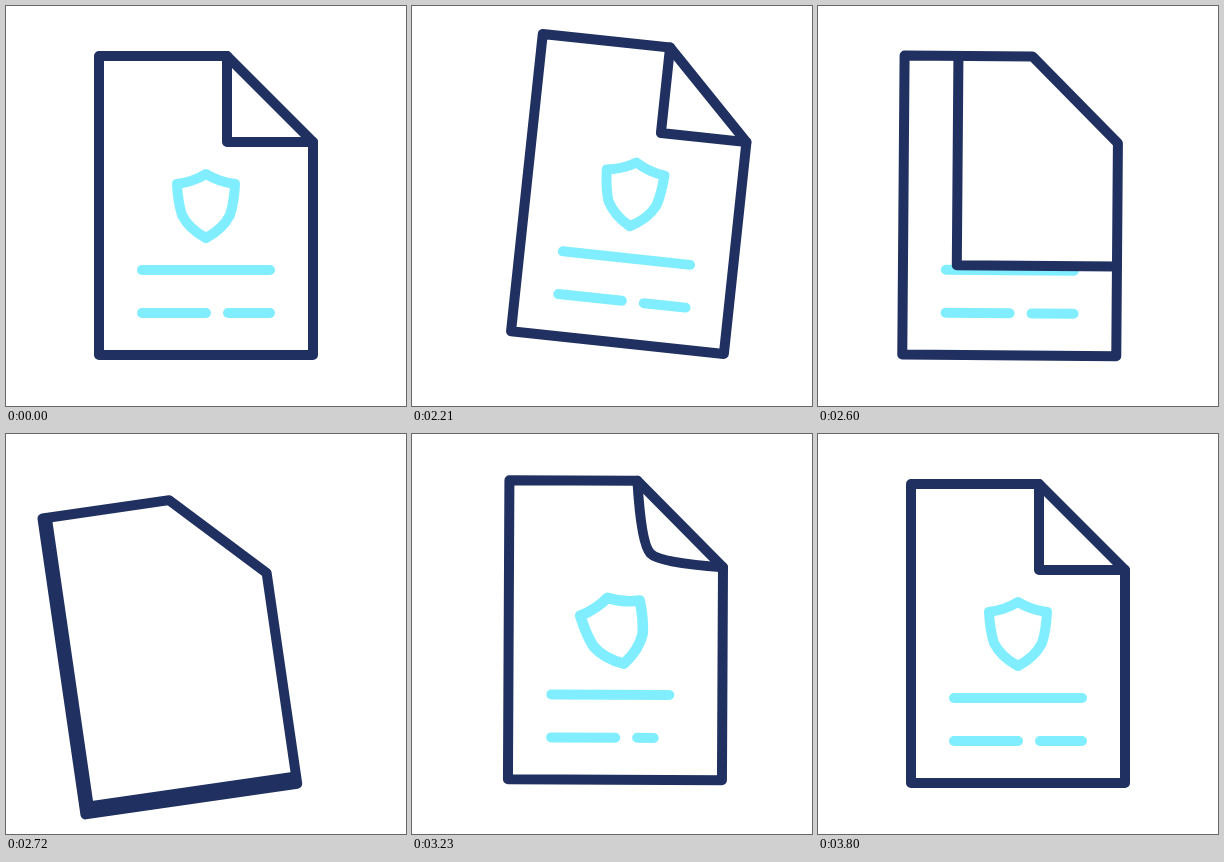
An HTML page with a canvas that plays this animation: 400 by 400 pixels, repeating every 3.86 s.

```html
<!DOCTYPE html>
<html lang="en">
<head>
<meta charset="utf-8">
<title>Document page turn</title>
<style>
  html, body { margin: 0; width: 100%; height: 100%; overflow: hidden; background: #fff; }
  canvas { display: block; width: 100vw; height: 100vh; }
</style>
</head>
<body>
<canvas id="stage" width="400" height="400"></canvas>
<script>
const ctx = document.getElementById('stage').getContext('2d');
const NAVY = '#203061', CYAN = '#80eeff';
const LOOP = 3860, START = 2030, STEP = 30, LAST = 3800;
const CX = 200, CY = 199.5;
const TURNED = 2760;

// Page geometry
const L = 93, T = 50, R = 307, B = 349, FX = 221, FY = 136;

const clamp = u => Math.min(1, Math.max(0, u));
const span = (t, a, b) => clamp((t - a) / (b - a));
const smooth = u => u * u * (3 - 2 * u);
const easeOut = u => 1 - (1 - u) * (1 - u);
const lerp = (a, b, u) => a + (b - a) * u;

// Keys are [time, value] pairs, eased in and out between neighbours
function track(t, keys) {
  let v = keys[0][1];
  for (let i = 1; i < keys.length; i++) {
    v = lerp(v, keys[i][1], smooth(span(t, keys[i - 1][0], keys[i][0])));
  }
  return v;
}

const ANGLE = [[1985, 0], [2405, 11], [2801, -10.6], [2897, -10.6], [3408, 4.5], [3790, 0]];
const MOVE_X = [[1985, 0], [2405, 38.5], [2746, -37.4], [2895, -37.4], [3380, 15.8], [3785, 0]];
const MOVE_Y = [[1985, 0], [2405, -20.9], [2798, 22], [2895, 22], [3351, -8.6], [3785, 0]];
const SHIELD_SIZE = [[TURNED, 0], [2985, 1], [3220, 1.06], [3500, 1]];
const SHIELD_TILT = [[2930, 0], [3220, -14.5], [3600, 0]];

function path(points) {
  ctx.beginPath();
  points.forEach(([x, y]) => ctx.lineTo(x, y));
}

function stroke(color) {
  ctx.strokeStyle = color;
  ctx.lineWidth = 10;
  ctx.stroke();
}

function bar(x1, x2, y, end) {
  if (end <= x1) return;
  path([[x1, y], [Math.min(x2, end), y]]);
  stroke(CYAN);
}

function shield(size, tilt) {
  if (size <= 0) return;
  ctx.save();
  ctx.translate(200, 200);
  ctx.rotate(tilt * Math.PI / 180);
  ctx.scale(size, size);
  ctx.beginPath();
  ctx.moveTo(0, -32);
  ctx.quadraticCurveTo(13, -24, 29, -22);
  ctx.quadraticCurveTo(28, -3, 24, 9);
  ctx.quadraticCurveTo(17, 23, 0, 32);
  ctx.quadraticCurveTo(-17, 23, -24, 9);
  ctx.quadraticCurveTo(-28, -3, -29, -22);
  ctx.quadraticCurveTo(-13, -24, 0, -32);
  ctx.closePath();
  stroke(CYAN);
  ctx.restore();
}

function content(size, tilt, p1, p2) {
  shield(size, tilt);
  bar(136, 264, 264, lerp(136, 264, p1));
  const end = lerp(136, 264, p2);
  bar(136, 200, 307, end);
  bar(222, 264, 307, end);
}

// The folded corner sweeps across to the bottom left
function sweepFold(u) {
  const x = lerp(FX, L, u), y = lerp(FY, B, u);
  path([[x, T], [x, y], [R, y], [R, FY], [FX, T]]);
  ctx.fillStyle = '#fff';
  ctx.fill();
  path([[x, T], [x, y], [R, y]]);
  stroke(NAVY);
}

// A new corner curls out of the diagonal edge
function curlFold(k) {
  const x = lerp((FX + R) / 2, FX, k), y = lerp((T + FY) / 2, FY, k);
  const h = 30 * (1 - k);
  ctx.beginPath();
  ctx.moveTo(FX, T);
  ctx.quadraticCurveTo(x - h, y - h, x, y);
  ctx.quadraticCurveTo(x + h, y + h, R, FY);
  stroke(NAVY);
}

function draw(t) {
  ctx.fillStyle = '#fff';
  ctx.fillRect(0, 0, 400, 400);
  ctx.lineCap = ctx.lineJoin = 'round';
  ctx.save();
  ctx.translate(CX + track(t, MOVE_X), CY + track(t, MOVE_Y));
  ctx.rotate(track(t, ANGLE) * Math.PI / 180);
  ctx.translate(-CX, -CY);

  if (t < TURNED) {
    content(1, 0, 1, 1);
    sweepFold(smooth(span(t, 2402, TURNED)));
  } else {
    content(track(t, SHIELD_SIZE), track(t, SHIELD_TILT),
      easeOut(span(t, 2740, 3420)), easeOut(span(t, 2845, 3540)));
    curlFold(smooth(span(t, 2859, 3449)));
  }

  path([[L, T], [FX, T], [R, FY], [R, B], [L, B]]);
  ctx.closePath();
  stroke(NAVY);
  ctx.restore();
}

function frame(now) {
  const t = now % LOOP;
  const held = t < START ? 0 : START + Math.floor((t - START) / STEP) * STEP;
  draw(Math.min(held, LAST));
  requestAnimationFrame(frame);
}

draw(0);
requestAnimationFrame(frame);
</script>
</body>
</html>
```
